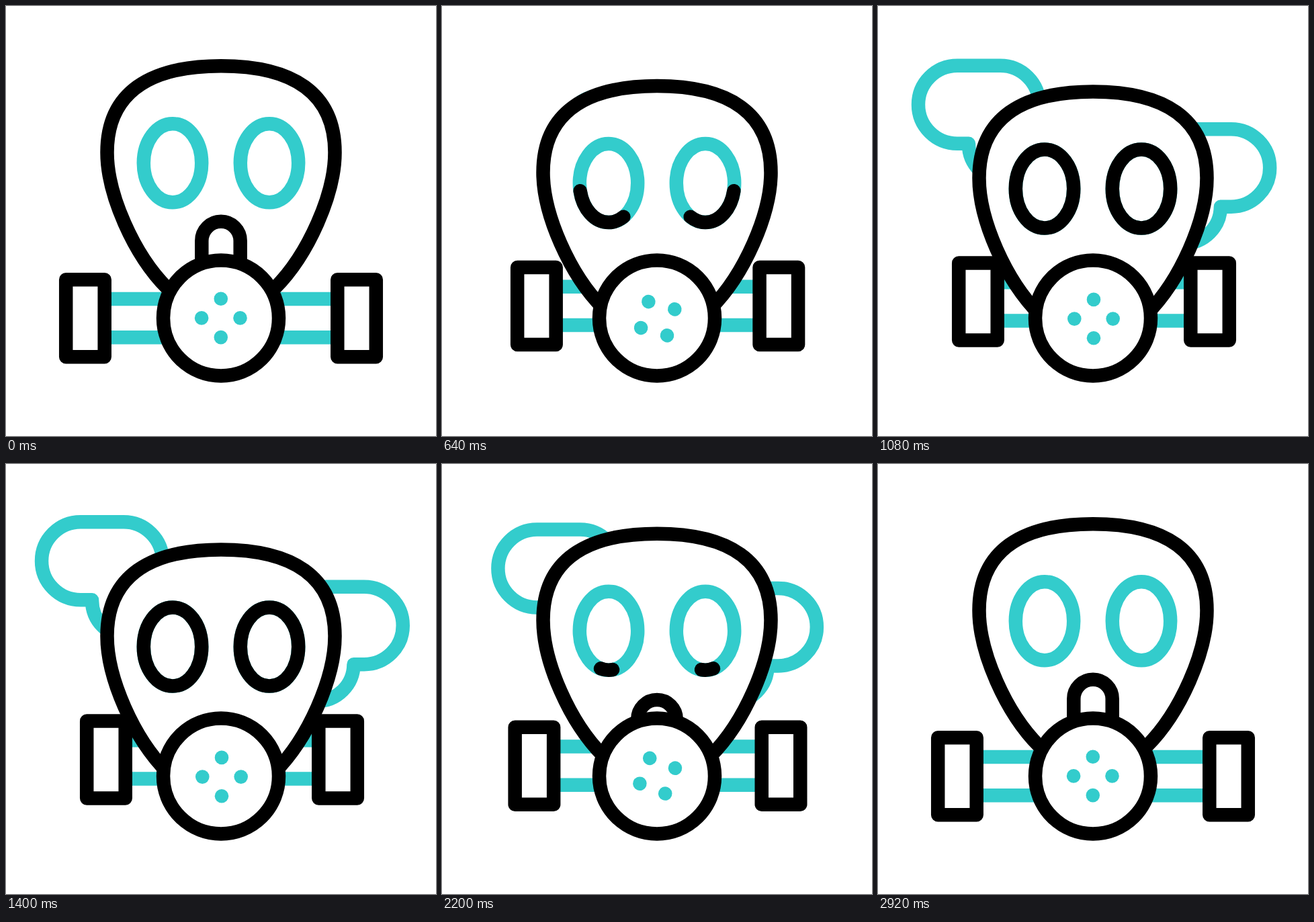
Write an HTML page that moves like this. It is 640 px wide and 640 px high and loops after 3 s.

```html
<!DOCTYPE html>
<html lang="en">
<head>
<meta charset="utf-8">
<title>Gas mask</title>
<style>
  html, body { margin: 0; width: 100%; height: 100%; overflow: hidden; background: #fff; }
  svg { display: block; width: 100vw; height: 100vh; }
  .line { fill: #fff; stroke: #000; stroke-width: 20.5; stroke-linejoin: round; stroke-linecap: round; }
  .teal { stroke: #3cc; }
  .open { fill: none; }
  .flat { stroke-linecap: butt; }
</style>
</head>
<body>
<svg viewBox="0 0 640 640">
  <defs>
    <path id="eye" d="M291.2 233.7A43.2 58.5 0 0 1 204.8 233.7A43.2 58.5 0 0 1 291.2 233.7" pathLength="1"/>
    <g id="filter">
      <path class="line teal open flat" d="M147 436H240M147 493.3H240"/>
    </g>
    <rect id="can" class="line" x="89.2" y="407.3" width="57.5" height="115"/>
  </defs>

  <path id="cloudL" class="line teal" d="M111 86.3H175A58 58 0 0 1 233 144.3V258H183A55 55 0 0 1 128 202.3H111A58 58 0 0 1 111 86.3Z"/>
  <path id="cloudR" class="line teal" d="M440 182.7H533A57.7 57.7 0 0 1 533 298.2H517.5A55 55 0 0 1 462.5 353H440Z"/>

  <g id="strapL"><use href="#filter"/></g>
  <g id="strapR"><use href="#filter" transform="matrix(-1 0 0 1 640 0)"/></g>

  <g id="head">
    <path class="line" d="M246 426L240 420C190 370 150.5 280 150.5 218C150.5 128 215 89.2 320 89.2S489.5 128 489.5 218C489.5 280 450 370 400 420L394 426"/>
    <g id="eyes"></g>
  </g>

  <g id="canL"><use href="#can"/></g>
  <g id="canR"><use href="#can" transform="matrix(-1 0 0 1 640 0)"/></g>

  <path id="nub" class="line flat" d="M291.3 385V349.5A28.7 28.7 0 0 1 348.7 349.5V385"/>
  <circle class="line" cx="320" cy="464.5" r="86"/>
  <g id="dots" fill="#3cc">
    <circle cx="319.8" cy="435.7" r="10.3"/>
    <circle cx="348.5" cy="464.4" r="10.3"/>
    <circle cx="319.8" cy="493.1" r="10.3"/>
    <circle cx="291.1" cy="464.4" r="10.3"/>
  </g>
</svg>
<script>
  const LOOP = 3000, STEP = 40, TRIM = 0.245;
  const $ = id => document.getElementById(id);

  // Each part goes out over [a, b] and back over [c, d], in ms.
  const times = {
    head: [0, 1079, 1497, 2814],
    can: [0, 1112, 1614, 2875],
    dots: [0, 1026, 1651, 2674],
    eyes: [240, 1157, 1640, 2430],
    cloud: [0, 1467, 1796, 2856]
  };

  function ease(t, from, to) {
    const u = Math.min(1, Math.max(0, (t - from) / (to - from)));
    return u < 0.5 ? 8 * u ** 4 : 1 - 8 * (1 - u) ** 4;
  }

  function progress(part, t) {
    const [a, b, c, d] = times[part];
    return ease(t, a, b) - ease(t, c, d);
  }

  function move(id, x, y) {
    $(id).setAttribute('transform', `translate(${x.toFixed(3)} ${y.toFixed(3)})`);
  }

  function addEye(cls, flip) {
    const eye = $('eye').cloneNode();
    eye.removeAttribute('id');
    eye.setAttribute('class', cls);
    if (flip) eye.setAttribute('transform', 'matrix(-1 0 0 1 640 0)');
    $('eyes').append(eye);
    return eye;
  }

  const lids = [false, true].map(flip => {
    addEye('line teal', flip);
    return addEye('line open', flip);
  });

  function draw(t) {
    const head = progress('head', t);
    move('head', 0, 38.3 * head);
    move('nub', 0, 80 * head);

    const can = progress('can', t);
    for (const id of ['strap', 'can']) {
      move(id + 'L', 31 * can, -24.8 * can);
      move(id + 'R', -28 * can, -24.8 * can);
    }

    $('dots').setAttribute('transform', `rotate(${180 * progress('dots', t)} 320.4 465)`);

    const back = 1 - progress('cloud', t);
    move('cloudL', 180 * back, 66 * back);
    move('cloudR', -195 * back, 13 * back);

    const lid = progress('eyes', t);
    for (const eye of lids) {
      eye.style.display = lid < 0.001 ? 'none' : '';
      eye.setAttribute('stroke-dasharray', `${lid} 2`);
      eye.setAttribute('stroke-dashoffset', -TRIM * (1 - lid));
    }
  }

  const start = performance.now();
  function tick() {
    const t = (performance.now() - start) % LOOP;
    draw(Math.floor(t / STEP) * STEP);
    requestAnimationFrame(tick);
  }
  draw(0);
  requestAnimationFrame(tick);
</script>
</body>
</html>
```
